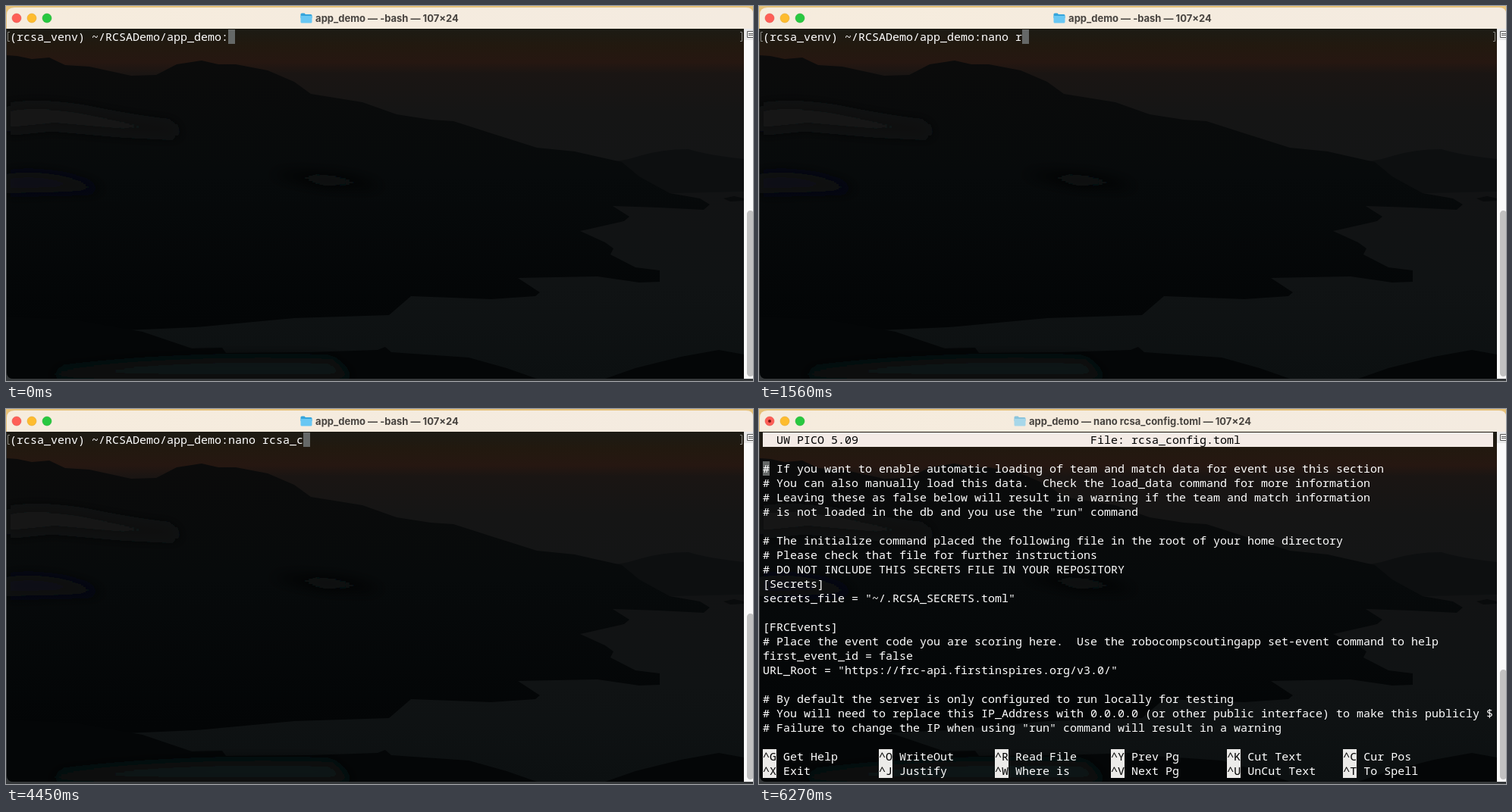
Animation, 985 px wide and 495 px high, one loop 8 s. Source, as an HTML page:

```html
<!DOCTYPE html>
<html lang="en">
<head>
<meta charset="utf-8">
<title>Terminal</title>
<style>
  html, body { margin: 0; width: 100%; height: 100%; overflow: hidden; background: #e9c986; }
  #stage { position: relative; width: 985px; height: 495px; overflow: hidden; }
  #stage > * { position: absolute; }
  svg { left: 0; top: 0; }
  pre { margin: 0; left: 5px; top: 31px; font: 15px/19px "Noto Sans Mono", "DejaVu Sans Mono", monospace;
        font-variant-ligatures: none; color: #fff; white-space: pre; }
  pre span { display: inline-block; height: 19px; vertical-align: top; }
  .cursor { background: #656867; }
  .bar { background: #f4ebe6; color: #000; width: 963px; }
  .key { background: #ecebe9; color: #000; }
  #title { top: 6px; left: 0; width: 985px; height: 20px; display: flex; justify-content: center; align-items: center;
           font: 700 13px/20px Inter, sans-serif; color: #47433f; }
  #title svg { position: static; margin-right: 4px; }
  #thumb { left: 977px; width: 9px; bottom: 6px; border-radius: 4.5px; background: #c1c1c1; }
</style>
</head>
<body>
<div id="stage">
  <svg width="985" height="495" viewBox="0 0 985 495">
    <defs>
      <linearGradient id="sky" x1="0" y1="30" x2="0" y2="250" gradientUnits="userSpaceOnUse">
        <stop offset="0" stop-color="#1c1b14"/>
        <stop offset=".1" stop-color="#22190f"/>
        <stop offset=".2" stop-color="#261711"/>
        <stop offset=".27" stop-color="#1a1513"/>
        <stop offset=".5" stop-color="#151515"/>
        <stop offset="1" stop-color="#131516"/>
      </linearGradient>
      <linearGradient id="land" x1="0" y1="65" x2="0" y2="420" gradientUnits="userSpaceOnUse">
        <stop offset="0" stop-color="#0b0b0b"/>
        <stop offset=".45" stop-color="#070a0b"/>
        <stop offset="1" stop-color="#030506"/>
      </linearGradient>
      <linearGradient id="sea" x1="0" y1="245" x2="0" y2="492" gradientUnits="userSpaceOnUse">
        <stop offset="0" stop-color="#121314"/>
        <stop offset=".5" stop-color="#101314"/>
        <stop offset="1" stop-color="#0c1011"/>
      </linearGradient>
      <linearGradient id="chrome">
        <stop offset="0" stop-color="#f6ecdd"/>
        <stop offset="1" stop-color="#f4ebe0"/>
      </linearGradient>
      <filter id="soft" x="-30%" y="-60%" width="160%" height="220%"><feGaussianBlur stdDeviation="9"/></filter>
      <clipPath id="window"><path d="M1 12Q1 2 11 2H976Q985 2 985 10V492H10Q1 492 1 483Z"/></clipPath>
    </defs>
    <path fill="#e6c179" d="M0 0H985V30H0z"/>
    <path fill="#35383a" d="M0 30H985V495H0z"/>
    <g clip-path="url(#window)">
      <path fill="url(#sky)" d="M0 30H973V260H0z"/>
      <path fill="url(#sea)" d="M0 246H973V492H0z"/>
      <path fill="#0d0f10" d="M780 207Q812 206 835 198Q865 189 900 189Q925 197 973 202V245L880 247L760 240z"/>
      <path fill="url(#land)" d="M0 65L15 66L34 70L57 68L78 78L110 80L165 92L198 91L225 77L258 72L280 77L303 77L345 85
        L380 100L402 116L470 127L515 143L560 150L590 152L640 168L700 187L750 192L812 206L835 225L875 247L915 254
        L928 262L920 269L860 266L800 264L822 278L815 284L757 297L790 312L801 320L797 328L830 345L862 349
        L862 364L835 365L780 357L675 359L704 378L698 383L640 387L534 383L505 408L380 412L250 424L0 435z"/>
      <path fill="#090b0c" d="M946 254L960 251L973 254V257L955 258z"/>
      <g filter="url(#soft)">
        <path fill="#131819" d="M0 134Q45 125 110 138T220 155L230 172L150 168L60 160L0 166z"/>
        <path fill="#0d1112" d="M0 222Q50 214 110 234L130 244L0 247z"/>
        <path fill="#0a0d0e" d="M345 222Q440 215 500 240L420 238z"/>
      </g>
      <path fill="#040607" d="M0 410L90 414L180 430L245 452L285 451L290 458L400 457L490 454L500 450L508 457L610 464L660 478L700 492H0z"/>
      <path fill="#040607" d="M790 492L830 478L890 463L940 454L973 460V492z"/>
      <path fill="#101415" filter="url(#soft)" d="M70 480Q220 460 430 466L460 492H60z"/>
      <path fill="#fafafa" d="M973 30H985V492H973z"/>
      <path fill="url(#chrome)" d="M0 2H985V30H0z"/>
      <path fill="#e9e9e9" d="M973 30H985V45H973z"/>
      <path fill="#fff" stroke="#555" d="M977.500 33.500H990V41.500H977.500z"/>
      <path stroke="#555" d="M979 36.500H985M979 38.500H985"/>
    </g>
    <g stroke-width=".5">
      <circle cx="14" cy="16" r="6" fill="#fe5f57" stroke="#df4942"/>
      <circle cx="34" cy="16" r="6" fill="#febc2e" stroke="#dfa023"/>
      <circle cx="54" cy="16" r="6" fill="#28c840" stroke="#1dad2b"/>
    </g>
    <circle id="edited" cx="14" cy="16" r="2" fill="#7d1713"/>
    <path id="marks" fill="none" stroke="#8b8b86" d="M5 34.500H2.500V46.500H5M968 34.500H970.500V46.500H968"/>
  </svg>
  <div id="title">
    <svg width="16" height="14" viewBox="0 0 16 14">
      <path fill="#35a5dc" d="M.5 2Q.5.500 2 .500H5.500L7 2H14Q15.500 2 15.500 3.500V7H.5z"/>
      <path fill="#68c7f3" d="M.5 4H15.500V12Q15.500 13.500 14 13.500H2Q.5 13.500 .5 12z"/>
    </svg>
    <span></span>
  </div>
  <pre></pre>
  <div id="thumb"></div>
</div>
<script>
const LOOP = 8000, OPEN = 6190, RETITLE = 6270;
const PROMPT = '(rcsa_venv) ~/RCSADemo/app_demo:';
const COMMAND = 'nano rcsa_config.toml ';
// [time in ms, characters typed]
const KEYS = [[0, 0], [500, 1], [580, 2], [660, 3], [820, 4], [980, 5], [1560, 6], [1720, 7],
  [1880, 8], [1960, 9], [2620, 10], [4450, 11], [4530, 12], [4690, 22]];

const FILE = `# If you want to enable automatic loading of team and match data for event use this section
# You can also manually load this data.  Check the load_data command for more information
# Leaving these as false below will result in a warning if the team and match information
# is not loaded in the db and you use the "run" command

# The initialize command placed the following file in the root of your home directory
# Please check that file for further instructions
# DO NOT INCLUDE THIS SECRETS FILE IN YOUR REPOSITORY
[Secrets]
secrets_file = "~/.RCSA_SECRETS.toml"

[FRCEvents]
# Place the event code you are scoring here.  Use the robocompscoutingapp set-event command to help
first_event_id = false
URL_Root = "https://frc-api.firstinspires.org/v3.0/"

# By default the server is only configured to run locally for testing
# You will need to replace this IP_Address with 0.0.0.0 (or other public interface) to make this publicly $
# Failure to change the IP when using "run" command will result in a warning`;
const MENU = [
  ['G Get Help', 'O WriteOut', 'R Read File', 'Y Prev Pg', 'K Cut Text', 'C Cur Pos'],
  ['X Exit', 'J Justify', 'W Where is', 'V Next Pg', 'U UnCut Text', 'T To Spell'],
];

const find = selector => document.querySelector(selector);
const span = (name, text) => `<span class="${name}">${text}</span>`;
const menuRow = items => items.map(item => span('key', '^' + item[0]) + item.slice(1).padEnd(15)).join('');
const editor = [
  span('bar', '  UW PICO 5.09'.padEnd(48) + 'File: rcsa_config.toml'),
  '',
  span('cursor', '#') + FILE.slice(1),
  '',
  ...MENU.map(menuRow),
].join('\n');

let shown;
function draw(now) {
  const time = now % LOOP;
  const open = time >= OPEN, retitled = time >= RETITLE;
  const typed = KEYS.findLast(([start]) => time >= start)[1];
  const state = `${open} ${retitled} ${typed}`;
  if (state !== shown) {
    shown = state;
    find('pre').innerHTML = open ? editor : PROMPT + COMMAND.slice(0, typed) + span('cursor', ' ');
    find('#title span').textContent = `app_demo — ${retitled ? 'nano rcsa_config.toml' : '-bash'} — 107×24`;
    find('#title svg').style.opacity = retitled ? .55 : 1;
    find('#edited').style.display = open ? '' : 'none';
    find('#marks').style.display = open ? 'none' : '';
    find('#thumb').style.height = (open ? 145 : 219) + 'px';
  }
  requestAnimationFrame(draw);
}
const start = performance.now();
draw(0);
requestAnimationFrame(function tick() {
  shown = shown;
});
</script>
</body>
</html>
```
